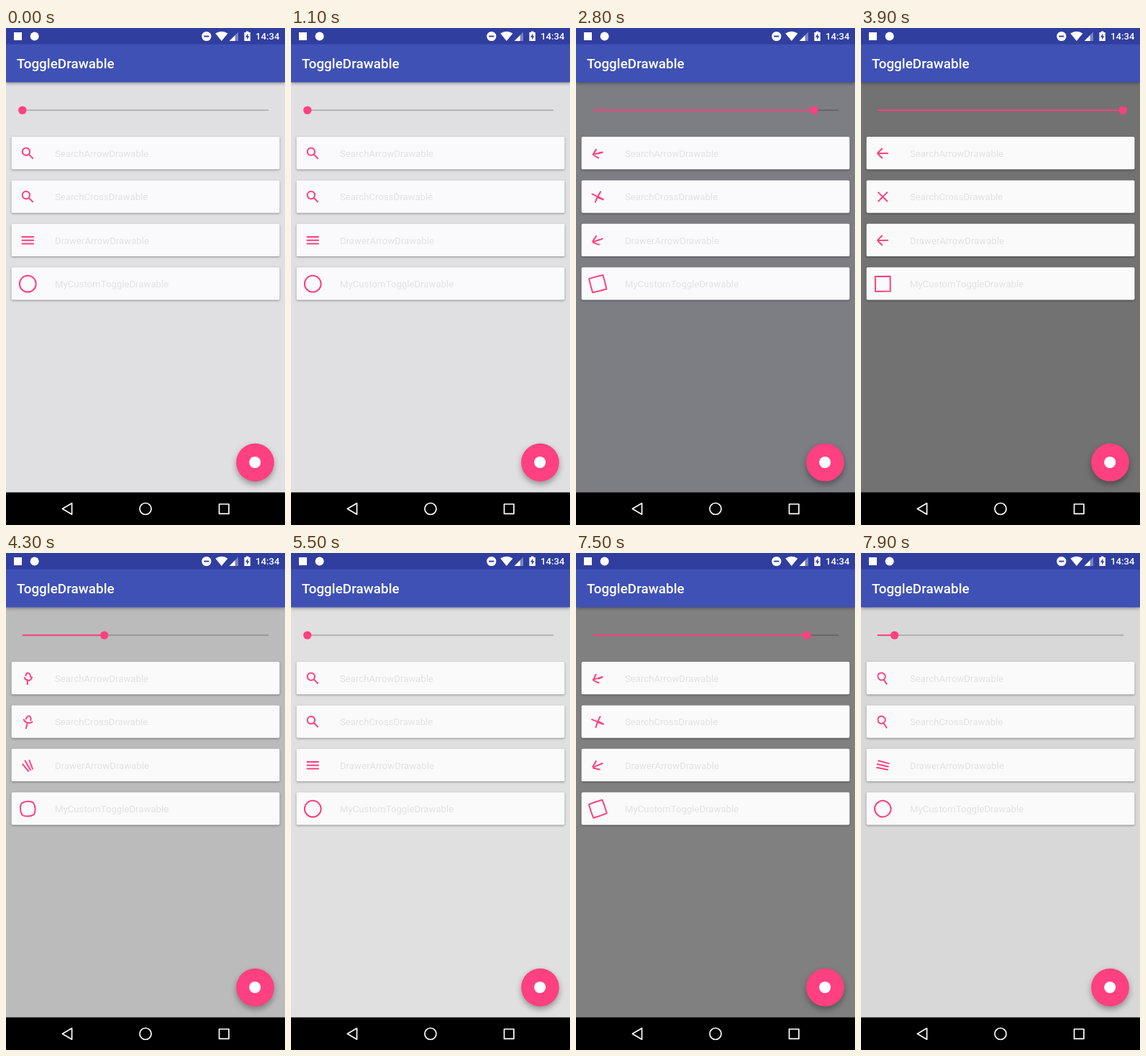
Recreate the animation shown at these times as an HTML page with a canvas. Size 388 px wide and 690 px high, loop 8000 ms.

```html
<!DOCTYPE html>
<html lang="en">
<head>
<meta charset="utf-8">
<title>ToggleDrawable</title>
<style>
  html, body { margin: 0; width: 100%; height: 100%; overflow: hidden; background: #000; }
  canvas { display: block; width: 388px; height: 690px; }
</style>
</head>
<body>
<canvas id="stage"></canvas>
<script>
const W = 388, H = 690, LOOP = 8000, STEP = 100;
const PINK = '#ff4081', BAR = '#303f9f', TAU = Math.PI * 2;
const canvas = document.getElementById('stage');
const ctx = canvas.getContext('2d');
const dpr = window.devicePixelRatio || 1;
canvas.width = W * dpr;
canvas.height = H * dpr;

const mix = (a, b, k) => a + (b - a) * k;
const mixPt = (a, b, k) => [mix(a[0], b[0], k), mix(a[1], b[1], k)];
const polar = (r, deg) => [r * Math.cos(deg * TAU / 360), r * Math.sin(deg * TAU / 360)];

// Each toggle: when it becomes visible, where its easing begins, how long it lasts
const moves = [
  { show: 2400, start: 2225, dur: 723, to: 1 },
  { show: 3900, start: 3874, dur: 700, to: 0 },
  { show: 5900, start: 5848, dur: 700, to: 1 },
  { show: 7500, start: 7343, dur: 671, to: 0 }
];

function progress(t) {
  const m = moves.filter(v => t >= v.show).pop();
  if (!m) return 0;
  const u = Math.min(1, (t - m.start) / m.dur);
  const eased = (1 - Math.cos(Math.PI * u)) / 2;
  return m.to ? eased : 1 - eased;
}

// Cubic segments, four points each
const line = (a, b) => [a, mixPt(a, b, 1 / 3), mixPt(a, b, 2 / 3), b];

function arc(cx, cy, r, deg) {
  const k = r * 0.5523;
  const at = (d, tangent) => {
    const p = polar(r, d), q = polar(tangent, d + 90);
    return [cx + p[0] + q[0], cy + p[1] + q[1]];
  };
  return [at(deg, 0), at(deg, k), at(deg + 90, -k), at(deg + 90, 0)];
}

const quarters = [0, 1, 2, 3];
const lens = quarters.map(i => arc(-2.36, -2.36, 5.2, 45 + 90 * i));
const search = [...lens, line([1.3, 1.3], [7.5, 7.5])];

const O = [0, 0], tip = [7.6, 0], tail = [-7.6, 0], up = [0.5, -7], low = [0.5, 7];
const X = 6.6;
const arrow = [line(tip, low), line(O, tail), line(tail, O), line(up, tip), line(O, tip)];
const cross = [
  line(O, [-X, X]), line(O, [-X, -X]), line([-X, -X], O),
  line([X, -X], O), line(O, [X, X])
];
const drawer = [-4.7, 0, 4.7].map(y => line([-8.6, y], [8.6, y]));
const drawerArrow = [line(up, tip), line(tail, tip), line(low, tip)];

const ring = quarters.map(i => arc(0, 0, 11.4, 90 * i));
const corner = i => polar(10.4 * Math.SQRT2, 90 * i - 45);
const square = quarters.map(i => line(corner(i), corner(i + 1)));

const rows = [
  { label: 'SearchArrowDrawable', from: search, to: arrow },
  { label: 'SearchCrossDrawable', from: search, to: cross },
  { label: 'DrawerArrowDrawable', from: drawer, to: drawerArrow },
  { label: 'MyCustomToggleDrawable', from: ring, to: square, closed: true }
];

function text(str, x, y, font, color) {
  ctx.font = font + ' Roboto, sans-serif';
  ctx.fillStyle = color;
  ctx.fillText(str, x, y);
}

function rect(x, y, w, h, color) {
  ctx.fillStyle = color;
  ctx.fillRect(x, y, w, h);
}

function disc(x, y, r, color) {
  ctx.fillStyle = color;
  ctx.beginPath();
  ctx.arc(x, y, r, 0, TAU);
  ctx.fill();
}

function poly(points, color) {
  ctx.fillStyle = color;
  ctx.beginPath();
  points.forEach(p => ctx.lineTo(p[0], p[1]));
  ctx.closePath();
  ctx.fill();
}

function withShadow(color, blur, dy, draw) {
  ctx.save();
  ctx.shadowColor = color;
  ctx.shadowBlur = blur * dpr;
  ctx.shadowOffsetY = dy * dpr;
  draw();
  ctx.restore();
}

function icon(row, x, y, p) {
  ctx.save();
  ctx.translate(x, y);
  ctx.rotate(Math.PI * p);
  ctx.strokeStyle = PINK;
  ctx.lineWidth = 2;
  ctx.lineJoin = 'round';
  ctx.beginPath();
  row.from.forEach((seg, i) => {
    const [a, b, c, d] = seg.map((pt, j) => mixPt(pt, row.to[i][j], p));
    if (!row.closed || i === 0) ctx.moveTo(...a);
    ctx.bezierCurveTo(...b, ...c, ...d);
  });
  if (row.closed) ctx.closePath();
  ctx.stroke();
  ctx.restore();
}

function card(row, i, p, fill) {
  const y = 151 + 60.4 * i;
  withShadow('rgba(0,0,0,.38)', 3, 1, () => {
    ctx.fillStyle = fill;
    ctx.beginPath();
    ctx.roundRect(7.6, y, 372.9, 45.3, 1.9);
    ctx.fill();
  });
  icon(row, 30.3, y + 23, p);
  text(row.label, 68, y + 27.8, '13.2px', '#e2e2e3');
}

function slider(p) {
  const x = 22.8 + 342.4 * p;
  rect(22.8, 113.2, 342.4, 1.9, 'rgba(0,0,0,.2)');
  rect(22.8, 113.2, x - 22.8, 1.9, PINK);
  disc(x, 114.1, 5.7, PINK);
}

function statusBar() {
  rect(0, 0, W, 22.6, BAR);
  rect(11, 6, 11, 11, '#fff');
  disc(39.7, 11.5, 6, '#fff');

  disc(278.8, 11.5, 6.6, '#fff');
  rect(275.2, 10.6, 7.2, 1.9, BAR);

  ctx.fillStyle = '#fff';
  ctx.beginPath();
  ctx.moveTo(299.8, 18);
  ctx.lineTo(291.2, 7.6);
  ctx.quadraticCurveTo(299.8, 2, 308.4, 7.6);
  ctx.fill();

  poly([[310.6, 18], [323, 18], [323, 5.5]], 'rgba(255,255,255,.35)');
  poly([[310.6, 18], [318.6, 18], [318.6, 10]], '#fff');

  rect(331.4, 6, 8.4, 12, '#fff');
  rect(333.8, 4.6, 3.6, 1.6, '#fff');
  poly([[336.5, 7.5], [333, 12.7], [335.2, 12.7], [335, 16.5], [338.4, 11.3], [336.3, 11.3]], BAR);

  text('14:34', 347, 16.2, '500 13.2px', '#fff');
}

function navBar() {
  rect(0, 644.7, W, H - 644.7, '#000');
  ctx.strokeStyle = '#fff';
  ctx.lineWidth = 1.7;
  ctx.lineJoin = 'round';
  ctx.beginPath();
  ctx.moveTo(78.4, 667.5);
  ctx.lineTo(91.6, 659.8);
  ctx.lineTo(91.6, 675.2);
  ctx.closePath();
  ctx.stroke();
  ctx.beginPath();
  ctx.arc(194, 667.5, 8, 0, TAU);
  ctx.stroke();
  ctx.strokeRect(296.5, 661, 13.4, 13.4);
}

function draw(t) {
  const p = progress(t);
  const cool = t < 3900;
  const grey = Math.round(mix(224, 114, p));
  const blue = Math.round(grey + (cool ? 2 + 6 * p : 0));

  ctx.setTransform(dpr, 0, 0, dpr, 0, 0);
  rect(0, 0, W, H, `rgb(${grey},${grey},${blue})`);
  slider(p);
  rows.forEach((row, i) => card(row, i, p, cool ? '#fafafc' : '#fafafa'));

  withShadow('rgba(0,0,0,.4)', 5, 2, () => rect(0, 22, W, 53.4, '#3f51b5'));
  statusBar();
  text('ToggleDrawable', 15.1, 56, '500 18.9px', '#fff');

  withShadow('rgba(0,0,0,.35)', 8, 4, () => disc(346.5, 603.2, 26.4, PINK));
  disc(346.2, 603, 8, '#fff');
  navBar();
}

function tick(now) {
  draw(Math.floor(now / STEP) * STEP % LOOP);
  requestAnimationFrame(tick);
}

draw(0);
requestAnimationFrame(tick);
</script>
</body>
</html>
```
